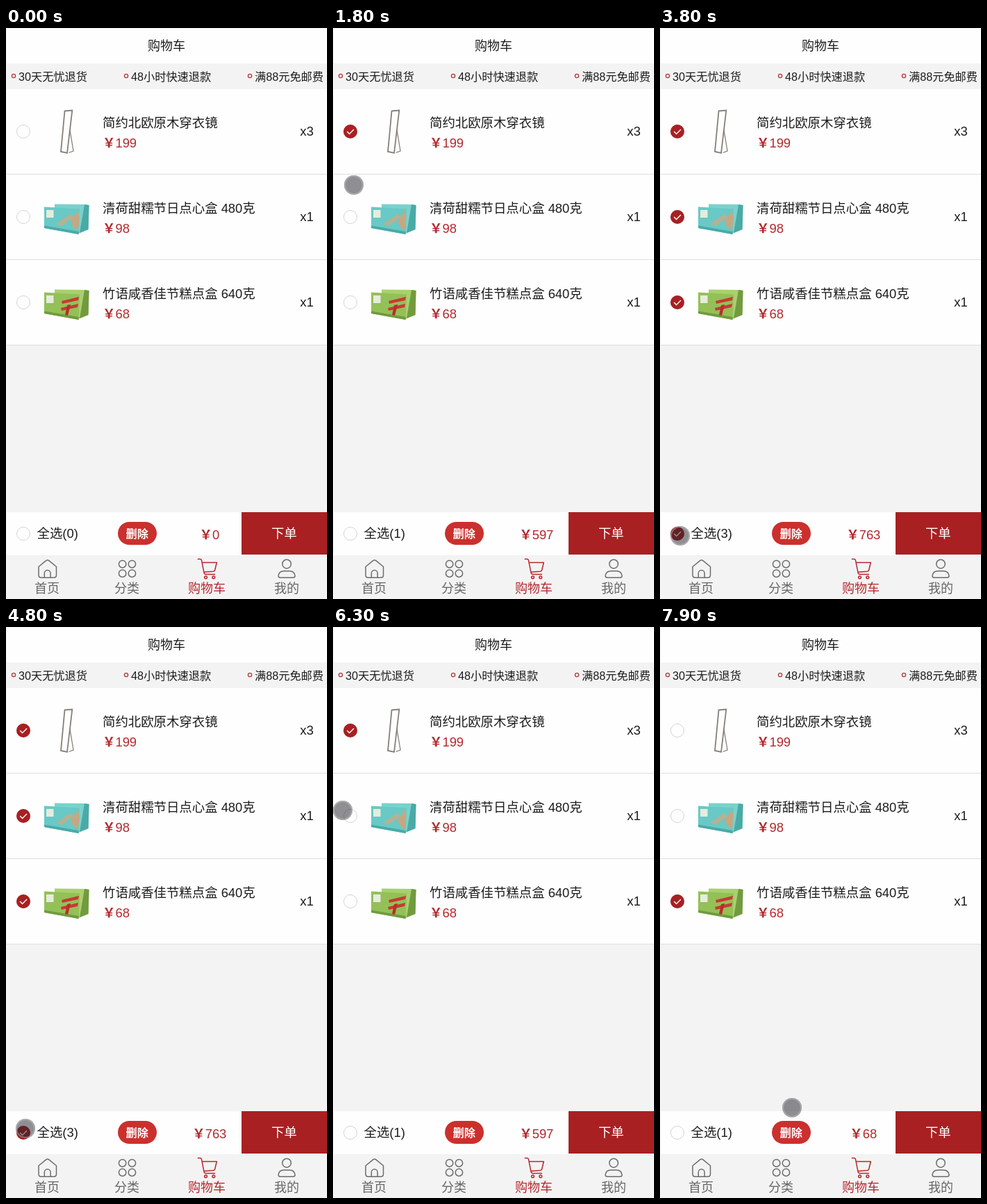
An HTML page that plays this animation: 462x822 px, repeating every 8 s.

```html
<!DOCTYPE html>
<html lang="zh-CN">
<head>
<meta charset="utf-8">
<title>购物车</title>
<style>
  html, body { margin: 0; width: 100%; height: 100%; overflow: hidden; background: #f4f3f4; }
  svg { display: block; width: 100vw; height: 100vh; }
  text { font: 18.4px "Liberation Sans", "Noto Sans CJK SC", "Noto Sans CJK", sans-serif; fill: #1c1c1c; }
  .mid { text-anchor: middle; }
  .end { text-anchor: end; }
  .note { font-size: 16.2px; }
  .price { fill: #b4282d; }
  .yen { font-weight: 700; }
  .light { fill: #fff; }
  .panel { fill: #fefefe; }
  .icon { fill: none; stroke: #6c6c6c; stroke-width: 1.5; stroke-linejoin: round; stroke-linecap: round; }
  .tab { font-size: 18px; fill: #666; text-anchor: middle; }
  .active .icon { stroke: #b4282d; }
  .active .tab { fill: #b4282d; }
</style>
</head>
<body>
<svg id="stage" viewBox="0 0 462 822" preserveAspectRatio="none">
  <rect width="462" height="822" fill="#f4f3f4"/>
  <rect class="panel" x="1" y="1" width="461" height="50"/>
  <text class="mid" x="231" y="32" style="font-size:18px">购物车</text>
  <g id="notes"></g>
  <g id="rows"></g>

  <rect class="panel" x="1" y="697" width="338" height="62"/>
  <text id="count" x="44.5" y="733.5"></text>
  <rect x="161" y="711" width="56" height="33" rx="16.5" fill="#cb302d"/>
  <text class="mid light" x="188.7" y="733.5" style="font-size:16.2px;font-weight:700">删除</text>
  <text class="price mid" x="292.8" y="736"><tspan class="yen">￥</tspan><tspan id="total"></tspan></text>
  <rect x="339" y="697" width="123" height="61" fill="#a82022"/>
  <text class="mid light" x="400.3" y="733.5">下单</text>

  <g>
    <path class="icon" d="M47 775.5L57.5 766.8Q59.8 765 62 766.8L72.5 775.5V787.5Q72.5 791.3 68.7 791.3H50.8Q47 791.3 47 787.5ZM55.3 791V785a4.4 4.4 0 0 1 8.8 0V791"/>
    <text class="tab" x="59" y="812.5">首页</text>
  </g>
  <g>
    <g class="icon">
      <circle cx="167.6" cy="771.7" r="5.2"/><circle cx="181.4" cy="771.7" r="5.2"/>
      <circle cx="167.6" cy="785.2" r="5.2"/><circle cx="181.4" cy="785.2" r="5.2"/>
    </g>
    <text class="tab" x="174" y="812.5">分类</text>
  </g>
  <g class="active">
    <g class="icon">
      <path d="M276.3 764.5H279.3Q281 764.5 281.4 766.2L285 784.2Q285.5 786.5 287.8 786.5H300.5M282.2 769.5H303.3L300.6 780.5Q300.2 782 298.5 782.2L285 783.2"/>
      <circle cx="287.5" cy="790.8" r="1.9"/><circle cx="298.8" cy="790.8" r="1.9"/>
    </g>
    <text class="tab" x="289" y="812.5">购物车</text>
  </g>
  <g>
    <g class="icon">
      <circle cx="404" cy="771.6" r="6.3"/>
      <path d="M395 791.3Q392 791.3 392 788.5Q393 781.8 400 781.8H408Q415 781.8 416 788.5Q416 791.3 413 791.3Z"/>
    </g>
    <text class="tab" x="404" y="812.5">我的</text>
  </g>

  <g id="checks"></g>
  <g id="cursor">
    <circle r="14" fill="#202028" fill-opacity=".5"/>
    <circle r="12.9" fill="none" stroke="#c4c4c8" stroke-opacity=".5" stroke-width="2"/>
  </g>
</svg>
<script>
const LOOP = 8000, STEP = 100;
const byId = id => document.getElementById(id);
const rowY = i => 149 + i * 123;

const giftBox = (front, back, side, ribbon) => `
  <path d="M70 -18.5L113 -18L119.5 -17L118.5 18L103 24.5L70 17Z" fill="${back}"/>
  <path d="M113 -18L119.5 -17L118.5 18L106 23Z" fill="${side}"/>
  <path d="M55 -14.5L106 -11.5L104.5 25L55 16Z" fill="${front}"/>
  <path d="M55 12.5L104.7 21L104.5 25L55 16Z" fill="${side}"/>
  ${ribbon}
  <rect x="58" y="-10" width="10.5" height="11" fill="#e6ecdc"/>`;

const mirror = `
  <path d="M91.5 -5L97 28L90.5 30.5" fill="none" stroke="#858078" stroke-width="1.3"/>
  <path d="M84.5 -29.5L95.3 -30.5L88 31L79 29Z" fill="#fefefe" stroke="#858078" stroke-width="1.8"/>`;

const items = [
  { name: "简约北欧原木穿衣镜", price: 199, qty: 3, art: mirror },
  { name: "清荷甜糯节日点心盒 480克", price: 98, qty: 1,
    art: giftBox("#68c9c6", "#79d2cc", "#4aaaa6", `
      <path d="M101 -17Q106 -8 96 1Q90 8 99 16L103 20Q106 8 105 -3Z" fill="#c5a883"/>
      <path d="M72 10L92 -4L98 0L80 13Z" fill="#b3b295"/>`) },
  { name: "竹语咸香佳节糕点盒 640克", price: 68, qty: 1,
    art: giftBox("#94c058", "#a9d070", "#719b3e", `
      <path d="M80 -2L105 -8L104 -3L81 2Z" fill="#c83a32"/>
      <path d="M79 8L104 2L103 7L80 12Z" fill="#c83a32"/>
      <path d="M88 4L93 3L89 19L85 18Z" fill="#b5302a"/>`) }
];

byId("notes").innerHTML = [["30天无忧退货", 18], ["48小时快速退款", 180], ["满88元免邮费", 358]]
  .map(([label, x]) =>
    `<circle cx="${x - 7}" cy="69" r="2.6" fill="none" stroke="#b4383a" stroke-width="1.3"/>
     <text class="note" x="${x}" y="76">${label}</text>`).join("");

byId("rows").innerHTML = items.map((item, i) => `
  <g transform="translate(0 ${rowY(i)})">
    <rect class="panel" x="1" y="-61" width="461" height="122"/>
    <rect x="1" y="61" width="461" height="1" fill="#dedee2"/>
    ${item.art}
    <text x="139" y="-6.5">${item.name}</text>
    <text class="price" x="139" y="23"><tspan class="yen">￥</tspan>${item.price}</text>
    <text class="end" x="442.8" y="6">x${item.qty}</text>
  </g>`).join("");

byId("checks").innerHTML = [...items.map((_, i) => rowY(i)), 728].map(y => `
  <g transform="translate(25 ${y})">
    <circle r="9.5" fill="#fefefe" stroke="#d4d4d4"/>
    <g class="on">
      <circle r="10" fill="#a82022"/>
      <path d="M-4.8 0L-1.4 3.5L5 -3" fill="none" stroke="#fff" stroke-width="1.4"/>
    </g>
  </g>`).join("");
const ticks = document.querySelectorAll("#checks .on");

// The pointer rests at each stop; a tap toggles a row (or all) as the rest ends.
const ALL = items.length;
const stop = (arrive, x, y, tap = null, rest = tap === null ? 0 : 200) =>
  ({ arrive, x, y, tap, leave: arrive + rest });

const stops = [
  stop(300, 294, 263),
  stop(600, 36, 176, null, 400),
  stop(1100, 30, 244),
  stop(1400, 20, 155, 0),
  stop(1800, 30, 226),
  stop(2100, 27, 274, 1),
  stop(2700, 34, 404, null, 200),
  stop(3000, 29, 404, 2),
  stop(3800, 29, 731, ALL, 100),
  stop(4100, 36, 732, ALL, 300),
  stop(4700, 36, 732),
  stop(4800, 28, 722),
  stop(5200, 23, 399, 2),
  stop(5700, 136, 656),
  stop(6100, 14, 264, 1),
  stop(6700, 29, 146, 0),
  stop(7300, 28, 397, 2),
  stop(7900, 190, 692)
];

const ease = k => k * k * (3 - 2 * k);

function cursorAt(t) {
  const i = stops.findLastIndex(s => s.arrive <= t);
  const from = stops[i], to = stops[i + 1] || from;
  const k = t <= from.leave ? 0 : ease((t - from.leave) / (to.arrive - from.leave));
  return [from.x + (to.x - from.x) * k, from.y + (to.y - from.y) * k];
}

function selectionAt(t) {
  let selected = items.map(() => false);
  for (const { tap, leave } of stops) {
    if (tap === null || leave > t) continue;
    if (tap === ALL) selected = selected.fill(!selected.every(Boolean));
    else selected[tap] = !selected[tap];
  }
  return selected;
}

const show = (el, visible) => el.setAttribute("visibility", visible ? "visible" : "hidden");

function draw(time) {
  const t = Math.floor((time % LOOP) / STEP) * STEP;
  const selected = selectionAt(t);
  const chosen = items.filter((_, i) => selected[i]);
  [...selected, chosen.length === ALL].forEach((on, i) => show(ticks[i], on));
  byId("count").textContent = `全选(${chosen.length})`;
  byId("total").textContent = chosen.reduce((sum, item) => sum + item.price * item.qty, 0);

  const cursor = byId("cursor"), visible = t >= stops[0].arrive;
  show(cursor, visible);
  if (visible) cursor.setAttribute("transform", `translate(${cursorAt(t).join(" ")})`);
}

const start = performance.now();
function tick() {
  draw(performance.now() - start);
  requestAnimationFrame(tick);
}
tick();
</script>
</body>
</html>
```
